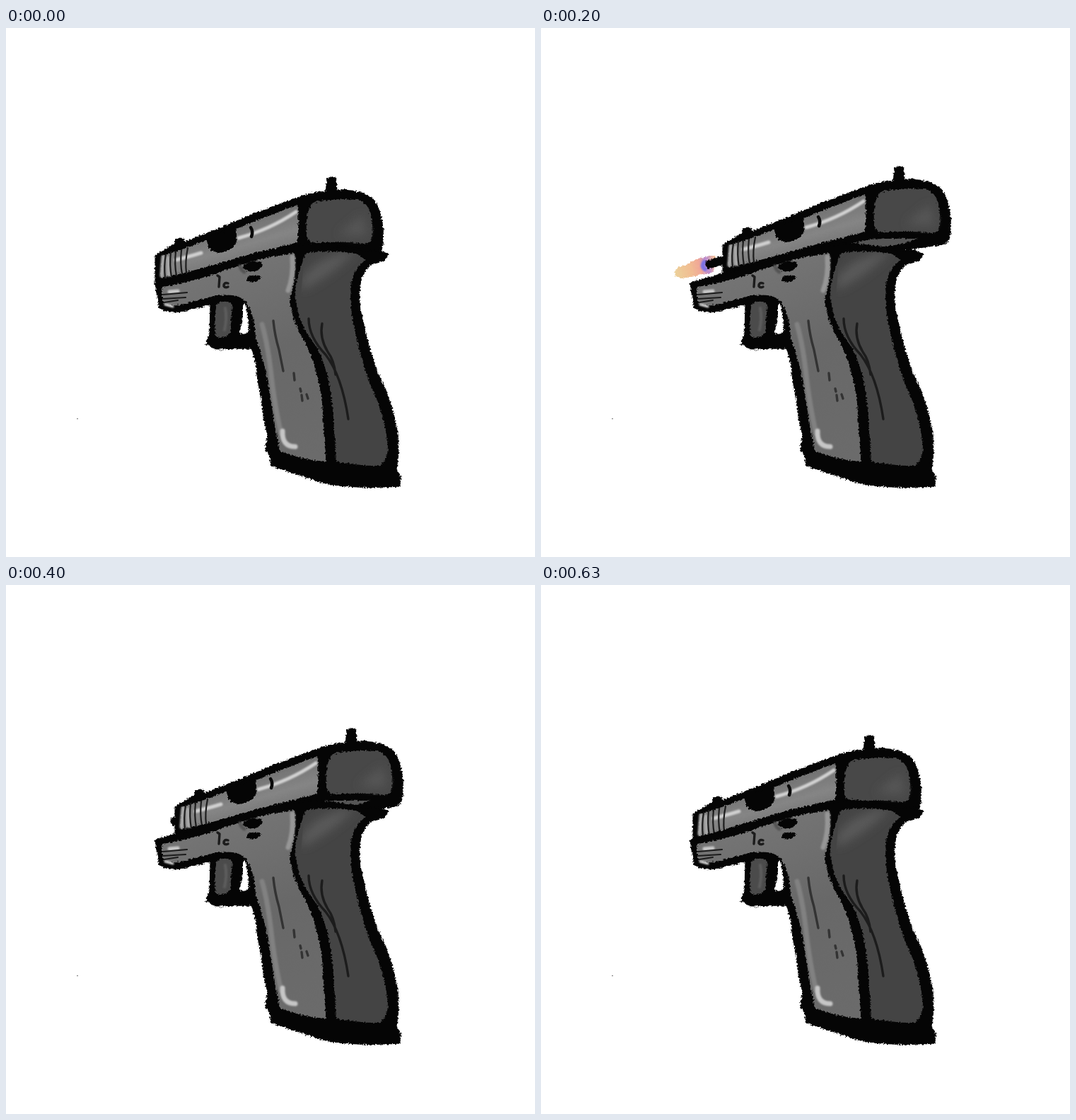
An HTML page that plays this animation: 748 px wide and 748 px high, repeating every 0.66 s.

```html
<!DOCTYPE html>
<html lang="en">
<head>
<meta charset="utf-8">
<title>Recoil loop</title>
<style>
html, body { margin: 0; width: 100%; height: 100%; overflow: hidden; background: #fff; }
svg { display: block; width: 100vw; height: 100vh; }
.ink { fill: #050505; stroke: #050505; stroke-width: 3; stroke-linejoin: round; }
.line { fill: none; stroke: #1c1c1c; stroke-width: 3.4; stroke-linecap: round; stroke-linejoin: round; }
.bold { stroke: #0a0a0a; stroke-width: 4.5; }
.faint { stroke: #333; }
.fine { stroke-width: 2.2; }
.glow { fill: none; stroke-linecap: round; filter: url(#soft); }
</style>
</head>
<body>
<svg viewBox="0 0 748 748">
  <defs>
    <filter id="fur" filterUnits="userSpaceOnUse" x="180" y="180" width="400" height="490" color-interpolation-filters="sRGB">
      <feTurbulence type="fractalNoise" baseFrequency=".36" numOctaves="2" seed="4"/>
      <feDisplacementMap in="SourceGraphic" scale="5.5" xChannelSelector="R" yChannelSelector="G"/>
      <feGaussianBlur stdDeviation=".5"/>
    </filter>
    <filter id="soft" filterUnits="userSpaceOnUse" x="170" y="180" width="420" height="490">
      <feGaussianBlur stdDeviation="1.3"/>
    </filter>
    <filter id="haze" filterUnits="userSpaceOnUse" x="170" y="180" width="420" height="490">
      <feGaussianBlur stdDeviation="7"/>
    </filter>
    <linearGradient id="side" gradientUnits="userSpaceOnUse" x1="300" y1="285" x2="316" y2="340">
      <stop offset="0" stop-color="#727272"/><stop offset=".55" stop-color="#858585"/><stop offset="1" stop-color="#747474"/>
    </linearGradient>
    <linearGradient id="grip" gradientUnits="userSpaceOnUse" x1="330" y1="330" x2="430" y2="610">
      <stop offset="0" stop-color="#747474"/><stop offset=".45" stop-color="#686868"/><stop offset="1" stop-color="#6b6b6b"/>
    </linearGradient>
    <linearGradient id="fire" gradientUnits="userSpaceOnUse" x1="190" y1="346" x2="246" y2="331">
      <stop offset="0" stop-color="#ecd09a"/><stop offset=".38" stop-color="#f1bd92"/>
      <stop offset=".62" stop-color="#f0a797"/><stop offset=".8" stop-color="#b98bd0"/><stop offset="1" stop-color="#f3c09c"/>
    </linearGradient>
    <clipPath id="back"><path d="M422 319Q460 314 496 319L509 328Q490 345 488 375L480 440L416 390Z"/></clipPath>
  </defs>

  <g id="flash" opacity="0">
    <path filter="url(#fur)" fill="url(#fire)" d="M189 349Q188 339 198 337Q207 335 211 332Q219 325 232 324Q246 319 248 326Q249 335 245 343Q238 350 228 347Q220 352 210 352Q196 357 189 349Z"/>
    <path class="glow" stroke="#7c72e6" stroke-width="6" d="M231 331Q226 337 232 341"/>
  </g>

  <path id="barrel" class="ink" filter="url(#fur)" d="M234 331L272 319L271 314L292 309V333L275 334L273 329L237 339Q233 337 234 331Z"/>

  <g id="slide">
    <g filter="url(#fur)">
      <path class="ink" d="M212 322L238 307Q240 299 246 298Q253 300 253 304L300 285L350 264L412 241Q434 233 453 232L455 214Q460 210 466 214L467 230Q488 229 508 236Q524 244 528 262Q534 284 532 306Q530 318 522 320Q490 325 429 333L359 331L270 352L212 363Z"/>
      <path fill="url(#side)" d="M221 322L250 313L300 294L350 274L412 250Q415 277 412 303L350 319L280 339L219 354Z"/>
      <path fill="#484848" d="M434 247Q465 240 498 243Q512 247 515 263Q520 281 518 295Q516 304 508 305Q474 301 434 304Q425 302 425 287Q423 262 434 247Z"/>
      <path fill="#555" d="M374 325L416 314Q448 312 486 313Q466 322 426 325Z"/>
      <path class="ink" d="M283 293L324 283L325 300Q321 313 305 316Q289 317 287 306Z"/>
    </g>
    <path filter="url(#haze)" fill="#565656" d="M470 292L504 264L510 294Z"/>
    <path class="glow" stroke="#d2d2d2" stroke-width="5" d="M329 297Q373 285 410 260"/>
    <path class="glow" stroke="#d0d0d0" stroke-width="5" d="M240 328Q260 323 276 318"/>
    <path class="glow" stroke="#a9a9a9" stroke-width="5" d="M222 324L220 350M229 325L230 349"/>
    <path class="line fine" d="M226 320Q223 337 225 353M233 317Q231 336 234 352M240 316Q238 335 241 350M248 314Q246 333 249 348M257 311Q253 330 255 347"/>
    <path class="line bold" d="M346 282Q350 288 347 295"/>
  </g>

  <g id="frame">
    <g filter="url(#fur)">
      <path class="ink" d="M212 361L240 353L300 335L350 320L410 306L440 305L500 313L527 315L539 320L536 327L515 334Q501 347 500 362Q497 383 500 398L510 442Q519 477 532 504L541 525Q548 546 553 574L554 602L551 624L557 635L556 647Q520 650 480 647Q452 645 430 636L376 618L374 605L368 596L371 576L365 550L362 522L357 500L355 476L348 452L297 453L284 446L289 433L290 390L243 401Q222 401 217 393Z"/>
      <path fill="url(#grip)" d="M221 366Q260 360 300 346L358 327L408 318Q411 347 401 385Q404 413 424 447Q441 482 447 530L452 613Q420 611 387 598Q380 565 375 530Q369 480 353 438Q351 401 338 386Q326 373 290 380L245 392Q226 394 221 386Z"/>
      <path fill="#444" d="M424 318Q460 313 495 319L509 328Q491 340 488 363Q485 402 496 439Q506 486 525 527Q536 556 540 590Q540 615 526 619Q500 619 467 613Q464 560 461 530Q457 488 440 452Q414 420 411 390Q406 372 414 346Z"/>
      <path fill="#4b4b4b" d="M298 390Q309 383 320 390L317 431Q310 440 297 437Q293 414 298 390Z"/>
      <path fill="#fff" d="M337 388Q343 404 343 430Q337 435 330 431Q336 410 335 393Z"/>
      <path class="ink" d="M336 338Q346 329 360 332Q364 336 355 341Q343 346 336 338ZM341 355Q348 349 359 352Q359 356 350 358Q342 359 341 355Z"/>
    </g>
    <path filter="url(#haze)" fill="#5a5a5a" clip-path="url(#back)" d="M416 362Q430 325 494 314Q470 344 420 370Z"/>
    <path class="glow" stroke="#969696" stroke-width="7" d="M405 324Q407 351 399 371"/>
    <path class="glow" stroke="#818181" stroke-width="7" d="M362 419Q371 450 376 500Q382 545 389 573"/>
    <path class="glow" stroke="#c6c6c6" stroke-width="7" d="M391 570Q390 592 409 592"/>
    <path class="glow" stroke="#c9c9c9" stroke-width="5" d="M231 373L243 372"/>
    <path class="glow" stroke="#e4e4e4" stroke-width="3" d="M225 391L236 394"/>
    <path class="glow" stroke="#555" stroke-width="5" d="M331 337Q332 342 337 345"/>
    <path class="glow" stroke="#5d5d5d" stroke-width="4" d="M310 396Q313 410 309 427"/>
    <path class="line fine" d="M222 377L256 374M222 383L254 381M224 388L243 385"/>
    <path class="line" d="M299 350L302 352L301 366M314 361Q308 359 308 365Q310 368 314 366"/>
    <path class="line faint" d="M378 414Q380 435 386 455L392 485M407 488L408 498M416 510L417 514M418 519L419 527M425 518L427 524"/>
    <path class="line" d="M428 411Q428 437 452 462Q475 492 484 553M447 418Q443 438 455 458Q464 470 466 490"/>
  </g>
  <circle cx="101" cy="552.5" r=".8" fill="#555"/>
</svg>
<script>
const LOOP = 660;

// start ms, slide x, slide y, flash opacity
const steps = [
  [0, 0, 0, 0],
  [100, 26, -5, 0],
  [200, 46, -15, 1],
  [300, 71, -23, 1],
  [400, 28, -8, 0],
  [600, -15, 7, 0],
  [630, 4, 2, 0],
];

function play(id, pose) {
  const frames = steps.map(step => ({ offset: step[0] / LOOP, easing: 'step-end', ...pose(step) }));
  frames.push({ ...frames.at(-1), offset: 1 });
  document.getElementById(id).animate(frames, { duration: LOOP, iterations: Infinity });
}

play('slide', ([, x, y]) => ({ transform: `translate(${x}px, ${y}px)` }));
play('flash', ([, , , opacity]) => ({ opacity }));
</script>
</body>
</html>
```
